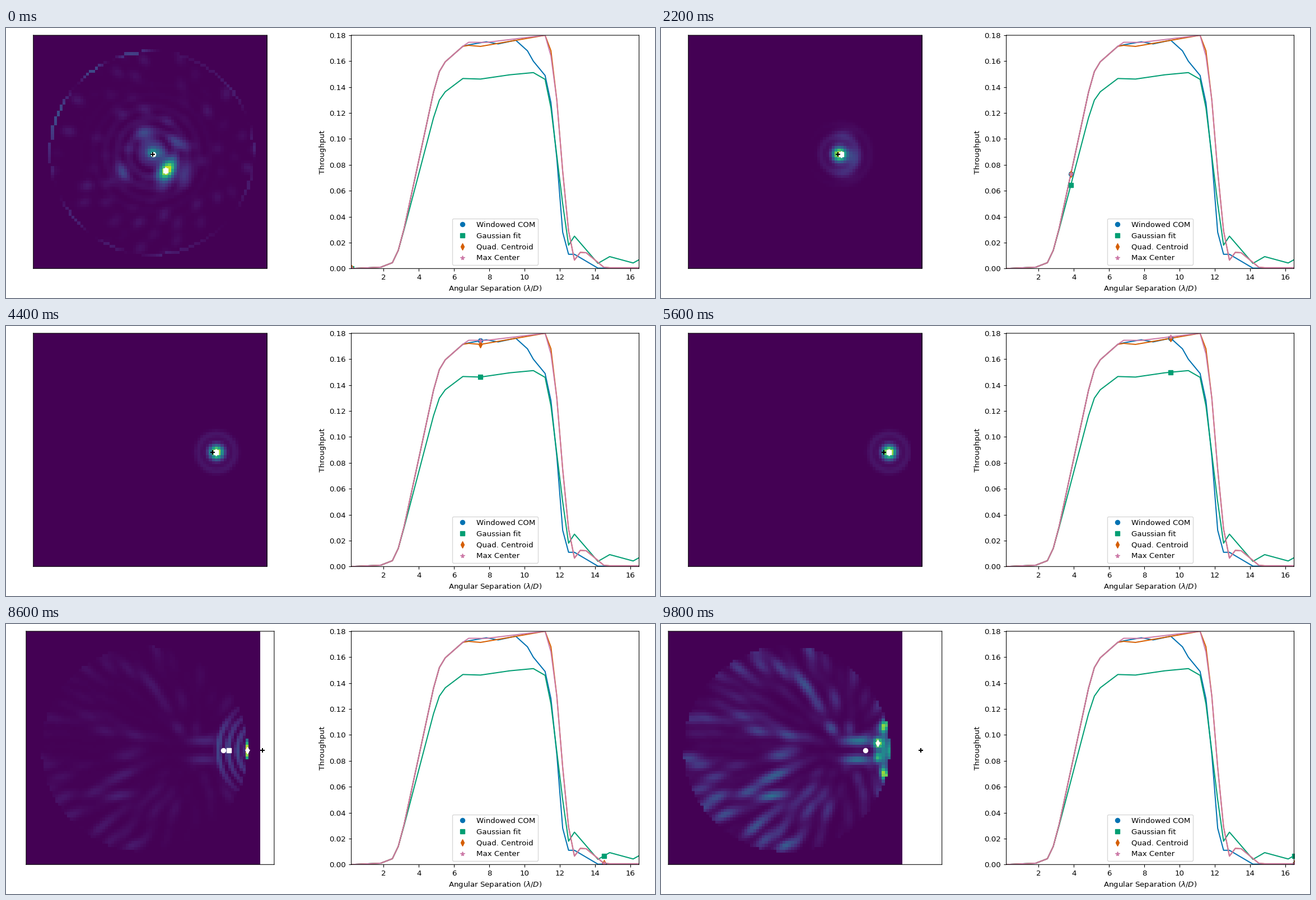
Animation of 1159 by 483 pixels, one loop 10 s. Source, as a matplotlib script:

```python
import numpy as np
import matplotlib.pyplot as plt
from matplotlib.animation import FuncAnimation

W, H = 1159, 483
DPI = W / 12
FRAMES, INTERVAL = 50, 200
STEPS = np.arange(FRAMES)
SEP = 1 / 6 + STEPS / 3
N, MID, ROW, RIM = 80, 40, 40.4, 75.3
COLORS = ["#0072B2", "#009E73", "#D55E00", "#CC79A7"]
NAMES = ["Windowed COM", "Gaussian fit", "Quad. Centroid", "Max Center"]
MARKERS = ["o", "s", "d", "*"]

# Throughput key points: (step, thousandths)
RISE = [(0, 0), (5, 1), (7, 4.5), (8, 14), (9, 31), (14, 136), (15, 152), (16, 159.5),
        (19, 171.5)]
FALL = [(35, 130), (36, 75), (37, 29), (38, 6.5), (39, 12.5), (40, 12.2), (43, 1),
        (44, .6), (49, .6)]
COM = [(20, 172.6), (23, 175), (25, 173.3), (28, 176.2), (30, 168), (31, 160),
       (33, 149), (34, 128), (35, 85), (36, 28), (37, 11), (38, 11), (42, .3), (49, .3)]
GAUSS = [(22, 146.2), (27, 149.5), (31, 151.2), (33, 146), (34, 124), (36, 50), (37, 18),
         (38, 25), (42, 4), (44, 9.2), (48, 4.3), (49, 6.8)]
QUAD = [(20, 172.2), (22, 171.4), (33, 180), (34, 168)]
PEAK = [(20, 174.6), (23, 174.5), (33, 180), (34, 164)]


def curve(points):
    steps, values = zip(*points)
    return np.interp(STEPS, steps, values) / 1000


def damped(points):
    return [(i, v * np.interp(i, [8, 13], [1, .855])) for i, v in points]


CURVES = [curve(RISE + COM), curve(damped(RISE) + GAUSS),
          curve(RISE + QUAD + FALL), curve(RISE + PEAK + FALL)]

X, Y = np.meshgrid(np.arange(N), np.arange(N))
RADIUS = np.hypot(X - MID, Y - MID)
MASK = RADIUS < 35.2


def blob(x, y, amp, sx, sy, deg=0):
    a = np.radians(deg)
    dx, dy = X - x, Y - y
    u = dx * np.cos(a) + dy * np.sin(a)
    v = dy * np.cos(a) - dx * np.sin(a)
    return amp * np.exp(-(u / sx) ** 2 / 2 - (v / sy) ** 2 / 2)


def speckles(count, seed, low, high, stretch, focus=(62, ROW), shift=0):
    """Blobs on a jittered spiral, pointing at the focus and longer far from it."""
    rng = np.random.default_rng(seed)
    total = np.zeros((N, N))
    for k in range(count):
        r, t = 36 * np.sqrt((k + rng.random()) / count), 2.4 * k + rng.normal(0, .03)
        x, y = MID + r * np.cos(t), MID + r * np.sin(t)
        dx, dy = focus[0] - x, focus[1] - y
        length = 1.2 + stretch * min(1, np.hypot(dx, dy) / 25)
        amp = low + (high - low) * rng.random() ** 2
        total += blob(x + shift, y, amp, length, 1.2, np.degrees(np.arctan2(dy, dx)))
    return total


def leak_scene(center):
    angle = np.arctan2(MID - Y, X - MID)
    dashes = .5 + .5 * np.sin(9 * angle + 2 * np.sin(3 * angle))
    side = .3 + .7 * np.clip(np.cos(angle - 2.5), 0, 1)
    rim = .24 * dashes * side * (RADIUS > 34.3)
    rings = .06 * np.cos(np.pi * RADIUS / 4) ** 2 * np.exp(-(RADIUS / 15) ** 2)
    core = (blob(45.2, 45.8, 1, 2.7, 1.7, -60) + blob(40.4, 39.8, .5, 2, 1.8)
            + blob(37.3, 33.5, .2, 2, 2) + blob(49.2, 36.7, .2, 2.2, 1.2, 35)
            + blob(29.9, 46.6, .2, 1.5, 2.2, -25) + blob(51.3, 47.3, .16, 1.3, 3, 25))
    return core + rings + rim + speckles(90, 4, 0, .07, .5)


def lobe_scene(center):
    total = blob(center + 4.3, ROW + .8, 1, 1.9, 2.3) + blob(center, ROW, .4, 1.8, 2)
    for side in (-1, 1):
        total += blob(center + 1.4, ROW + 6.1 * side, .5, 2.4, 1.7, 12 * side)
        total += blob(center + 4.5, ROW + 3.2 * side, .15, 1.5, 2)
    r = np.hypot(X - center, Y - ROW)
    arc = np.exp(-((r - 10.5) / 1.3) ** 2) * (.08 + .07 * (X - center) / (r + 1))
    return total + arc


def psf_scene(center):
    r = np.hypot(X - center, Y - ROW)
    return np.exp(-(r / 1.6) ** 2 / 2) + .055 * np.exp(-((r - 6.3) / .95) ** 2 / 2)


def fan(center):
    shift = 1.9 * (center / 3 - 29.7)
    bright = blob(35 + shift, 56, .3, 3.6, 1.1, -8) + blob(39.5 + shift, 73, .25, 2.6, 1.1, -25)
    return bright + speckles(120, 11, .02, .24, 1.8, shift=shift)


def beams(x, amp):
    return sum(blob(x, ROW + 3.2 * side, amp, 3.4, 1.1) for side in (-1, 1))


def arc_scene(center):
    r = np.hypot(X - center, Y - ROW)
    arcs = .24 * np.cos(np.pi * (r - 11.3) / 3.3) ** 2
    arcs *= (r < 19.5) * np.exp(-((Y - ROW) / 12) ** 2)
    return arcs + beams(60, .12) + blob(75, ROW, 1, .45, 2.3) + .3 * fan(center)


def edge_scene(center):
    total = beams(64, .38) + blob(73.4, ROW, .35, .8, 6) + blob(75, ROW, .4, .5, 4)
    for side in (-1, 1):
        total += blob(71.2, ROW + 2.4 * side, .75 - .1 * side, 1, 1.3)
        total += blob(73.4, ROW + 8.3 * side, .7 + .1 * side, .9, 1.7, -20 * side)
    return total + fan(center)


# Each scene fades between step and weight key points
SCENES = [(leak_scene, [0, 5], [1, 0]),
          (lobe_scene, [0, 6, 12], [0, 1, 0]),
          (psf_scene, [6, 12, 36, 42], [0, 1, 1, 0]),
          (arc_scene, [36, 42, 43, 49], [0, 1, 1, 0]),
          (edge_scene, [43, 49], [0, 1])]


def source_x(i):
    return 39.6 + 3 * SEP[i]


def field_image(i):
    total = np.zeros((N, N))
    for scene, steps, weights in SCENES:
        weight = np.interp(i, steps, weights)
        if weight > 0:
            img = scene(source_x(i)) * MASK
            total += weight * img / img.max()
    return total / total.max()


def spot_positions(i):
    """Estimates lead the source at first, then stick to the rim of the field."""
    x = source_x(i)
    lead = x + np.interp(i, [6, 12], [4.6, 0])
    top = (min(lead, RIM), ROW + 5.4 * max(0, 1 - i / 5))
    com = (min(x + np.interp(i, [0, 6, 12], [.5, 3.1, 0]),
               np.interp(i, [34, 43], [74, 67])), ROW)
    fit = (min(lead, np.interp(i, [36, 43], [75, 69])), top[1])
    if i >= 46:
        top = (71.2, 37.9)
    if i >= 48:
        fit = (93.4 - 4.7 * (i - 48), ROW)
    return [com, fit, top, top]


fig = plt.figure(figsize=(12, (H + .01) / DPI), dpi=DPI, facecolor="white")


def add_axes(left, right, top=13, bottom=430.3):
    ax = fig.add_axes([left / W, 1 - bottom / H, (right - left) / W, (bottom - top) / H])
    for spine in ax.spines.values():
        spine.set_snap(False)
    return ax


view = add_axes(.4, 514.4)
picture = view.imshow(np.zeros((N, N)), vmin=0, vmax=1, cmap="viridis",
                      interpolation="nearest")
view.set(xticks=[], yticks=[])
spots = [view.plot([], [], m, color="white", ms=6)[0] for m in MARKERS]
cross, = view.plot([], [], "+", color="black", ms=6, mew=1.5)

chart = add_axes(616.6, 1130.5)
for values, color in zip(CURVES, COLORS):
    chart.plot(SEP, values, color=color, lw=1.5)
dots = [chart.plot([], [], m, color=c, ms=6, label=n)[0]
        for m, c, n in zip(MARKERS, COLORS, NAMES)]
chart.set(xlim=(SEP[0], SEP[-1]), ylim=(0, .18), ylabel="Throughput",
          xlabel=r"Angular Separation ($\lambda/D$)",
          xticks=range(2, 17, 2), yticks=np.arange(10) * .02)
chart.yaxis.set_major_formatter("{x:.2f}")
chart.legend(loc="lower center")


def update(i):
    picture.set_data(field_image(i))
    cross_x = MID + 2.785 * SEP[i]
    cross.set_data([cross_x], [ROW])
    positions = spot_positions(i)
    for spot, (x, y) in zip(spots, positions):
        spot.set_data([x], [y])
    # The view widens with a 5% margin once a marker leaves the image
    edge = N - .5
    far = max(cross_x, *(x for x, _ in positions))
    view.set_xlim(-.5, far + .05 * (far + .5) if far > edge else edge)
    view.set_ylim(edge, -.5)
    for dot, values in zip(dots, CURVES):
        dot.set_data([SEP[i]], [values[i]])
    return [picture, cross, *spots, *dots]


anim = FuncAnimation(fig, update, frames=FRAMES, interval=INTERVAL,
                     repeat=True, repeat_delay=0)
plt.show()
```
